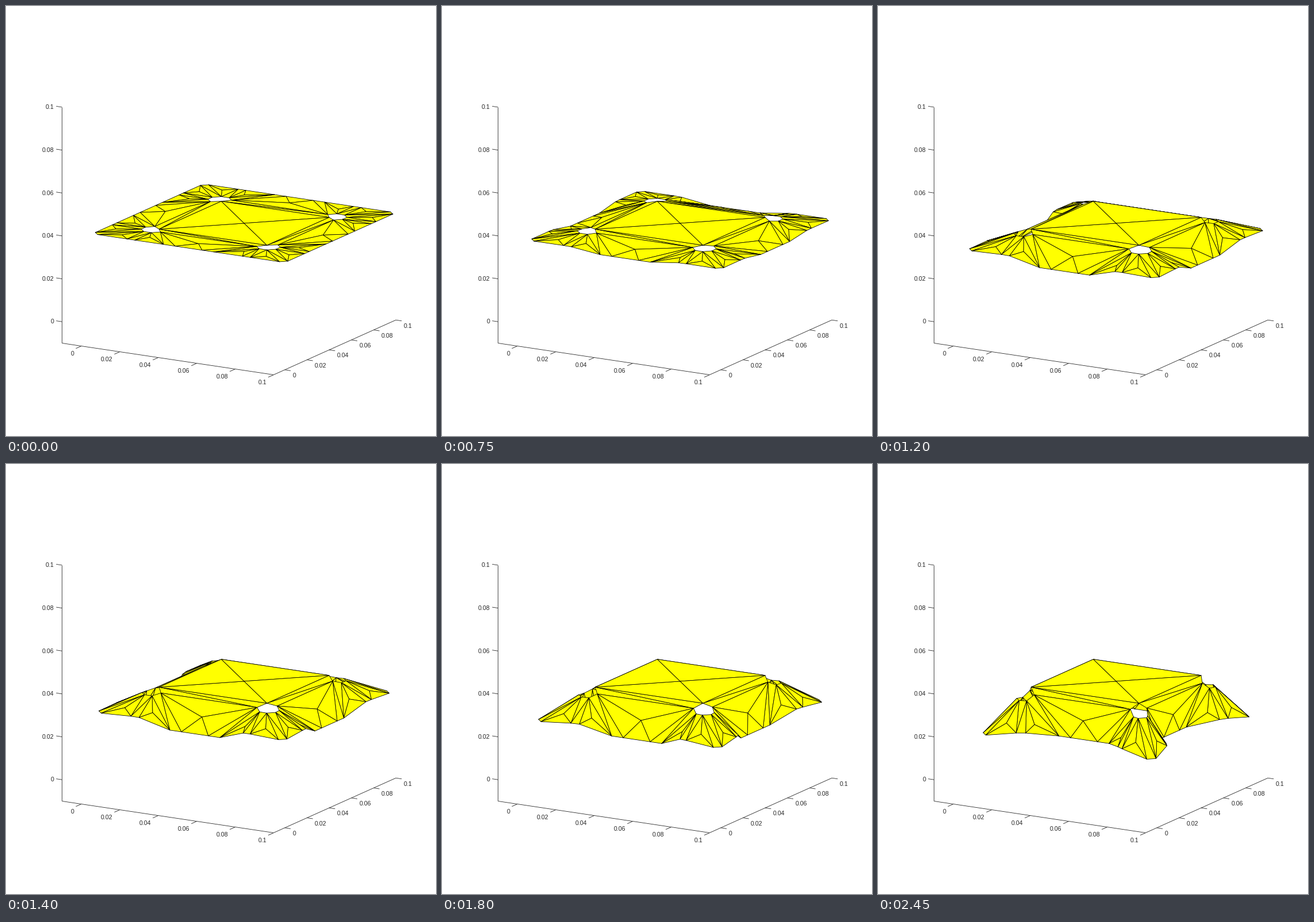
Recreate the animation shown at these times as a matplotlib script. Size 748 px wide and 748 px high, loop 2.5 s.

```python
import numpy as np
import matplotlib.pyplot as plt
from matplotlib.animation import FuncAnimation
from matplotlib.collections import PolyCollection

SIZE, DPI = 748, 100
FRAMES, INTERVAL, HOLD, STEPS = 50, 50, 9, 40
INK = "#262626"

# Orthographic camera; lengths are in units of 0.1
AZ, EL, SCALE = np.radians(30), np.radians(15), 386.4
EX = SCALE * np.array([np.cos(AZ), np.sin(AZ) * np.sin(EL)])
EY = SCALE * np.array([np.sin(AZ), -np.cos(AZ) * np.sin(EL)])
EZ = SCALE * np.array([0, -np.cos(EL)])
LOW = -0.1
ORIGIN = np.array([97, 586]) - LOW * (EX + EY + EZ)
AWAY = np.array([-np.sin(AZ) * np.cos(EL), np.cos(AZ) * np.cos(EL), -np.sin(EL)])

HEIGHT = 0.4
CREASE, WIDTH = 0.22, 0.04      # start and width of the rounded fold
MAX_ANGLE = np.radians(94.8)

# Corner points: x, y, inward drift in x and y, linear and quadratic drop
CORNER = {
    "T": (0.027, 0, 0.0545, 0.051, 0.206, 0.003),
    "B": (0.18, 0, 0.045, 0.077, 0.208, 0.028),
    "A": (0.22, 0, 0.040, 0.101, 0.215, 0.034),
    "N": (0.125, 0.05, 0.039, 0.045, 0.150, 0.004),
    "O": (0.255, 0.075, 0.020, 0.080, 0.200, 0.048),
    "E": (0.22, 0.15, 0.002, 0.0255, 0.0536, 0),
    "F": (0.18, 0.15, 0.0107, 0.0125, 0.053, 0),
}
# Points on the side flap, which rolls over the crease
FLAP = {"Q": (0.25, 0.18), "C": (0.43, 0), "D": (0.37, 0), "M": (0.5, 0.09)}


def project(p):
    p = np.asarray(p, float)
    return ORIGIN + p[..., :1] * EX + p[..., 1:2] * EY + p[..., 2:] * EZ


def bend(x, y, angle):
    flat = CREASE - y - WIDTH
    r = WIDTH / angle
    return np.array([x,
                     CREASE - r * np.sin(angle) - flat * np.cos(angle),
                     HEIGHT - r * (1 - np.cos(angle)) - flat * np.sin(angle)])


def octant(t):
    """Positions of the points in one eighth of the sheet."""
    angle = max(t * MAX_ANGLE, 1e-6)
    p = {k: bend(x, y, angle) for k, (x, y) in FLAP.items()}
    for k, (x, y, dx, dy, a, b) in CORNER.items():
        p[k] = np.array([x + dx * t * t, y + dy * t * t,
                         HEIGHT - a * t + b * t * t])
    p["I"] = np.array([CREASE, CREASE, HEIGHT])
    return p


def quad(a, b, c, d):
    return [(a, b, c), (a, c, d)]


def fan(hub, *ring):
    return [(hub, a, b) for a, b in zip(ring, ring[1:] + ring[:1])]


def mirror(tris, fx, fy, swap):
    out = np.array(tris)
    if fx:
        out[..., 0] = 1 - out[..., 0]
    if fy:
        out[..., 1] = 1 - out[..., 1]
    return out[..., [1, 0, 2]] if swap else out


def mesh(t):
    p = octant(t)
    flip = {k: v * [-1, 1, 1] + [1, 0, 0] for k, v in p.items()}
    diag = {k: v[[1, 0, 2]] for k, v in p.items()}
    centre = np.array([0.5, 0.5, HEIGHT])

    eighth = (quad(p["Q"], p["C"], p["D"], p["E"])
              + quad(p["E"], p["A"], p["B"], p["F"])
              + fan(p["O"], p["E"], p["D"], p["A"])
              + fan(p["N"], p["F"], p["B"], p["T"]))
    side = (quad(p["I"], flip["I"], flip["Q"], p["Q"])
            + fan(p["M"], p["Q"], p["C"], flip["C"], flip["Q"]))
    corner = quad(p["F"], p["T"], diag["T"], diag["F"])
    top = [(centre, p["I"], flip["I"])]

    flags = (0, 1)
    parts, panel = [], []
    for fy in flags:
        for swap in flags:
            parts += [mirror(eighth, fx, fy, swap) for fx in flags]
            parts.append(mirror(side, 0, fy, swap))
            panel.append(mirror(top, 0, fy, swap))
        parts += [mirror(corner, fx, fy, 0) for fx in flags]

    tris = np.concatenate(parts)
    order = np.argsort(-(tris.mean(axis=1) @ AWAY), kind="stable")
    # Nothing ever covers the middle panel, so it goes last
    return project(np.concatenate([tris[order]] + panel))


fig = plt.figure(figsize=(SIZE / DPI, SIZE / DPI), dpi=DPI, facecolor="white")
ax = fig.add_axes([0, 0, 1, 1])
ax.set_xlim(-0.5, SIZE - 0.5)
ax.set_ylim(SIZE - 0.5, -0.5)
ax.axis("off")


def line(a, b):
    ax.plot(*zip(a, b), color=INK, lw=0.6, solid_capstyle="butt")


def tick(start, direction, label, offset, align):
    line(start, start + 10.3 * direction / np.hypot(*direction))
    x, y = start + offset
    ax.text(x, y, label, ha=align, va="center_baseline", color=INK,
            fontsize=7.7, family="Liberation Sans")


def draw_axes():
    left, front, right, upper = project(
        [(LOW, LOW, LOW), (1, LOW, LOW), (1, 1, LOW), (LOW, LOW, 1)])
    for a, b in ((left, front), (front, right), (left, upper)):
        line(a, b)
    for i in range(6):
        v = i / 5
        label = f"{v / 10:g}"
        tick(project((v, LOW, LOW)), -EY, label, (-12.4, 12.8), "right")
        tick(project((1, v, LOW)), EX, label, (13.5, 9.3), "left")
        tick(project((LOW, LOW, v)), -EX, label, (-13.8, -0.7), "right")


draw_axes()
sheet = PolyCollection(mesh(0), facecolors="yellow", edgecolors="black",
                       linewidths=0.58, joinstyle="round", zorder=5)
ax.add_collection(sheet, autolim=False)


def update(i):
    sheet.set_verts(mesh(max(0, i - HOLD) / STEPS))
    return [sheet]


anim = FuncAnimation(fig, update, frames=FRAMES, interval=INTERVAL,
                     repeat=True, repeat_delay=0, blit=False)
plt.show()
```
